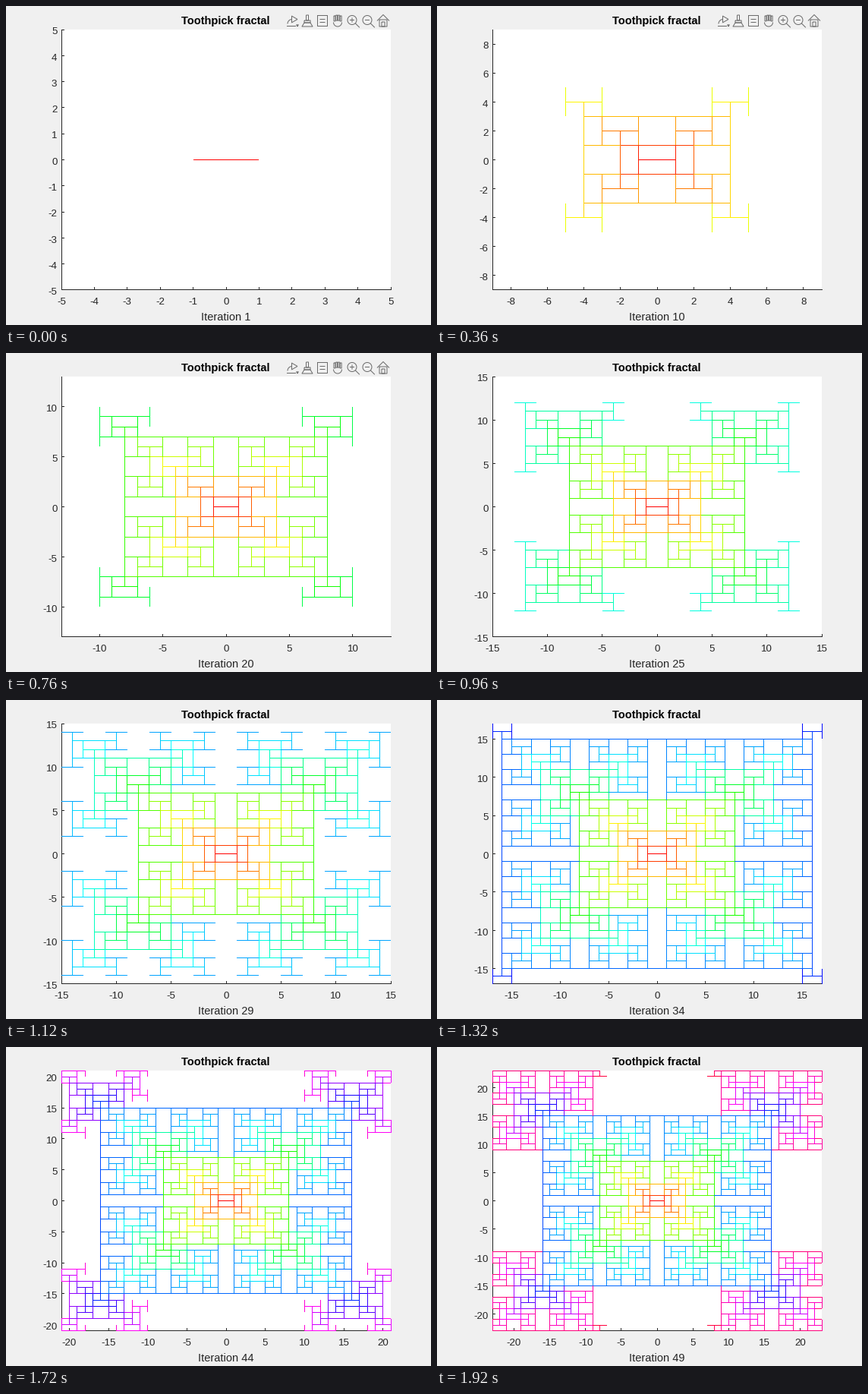
A matplotlib script that plays this animation: 560x420 px, repeating every 1960 ms.

```python
import colorsys
from collections import Counter

import matplotlib.pyplot as plt
import numpy as np
from matplotlib.animation import FuncAnimation
from matplotlib.collections import LineCollection
from matplotlib.patches import Rectangle

W, H, DPI = 560, 420, 70
PX = 72 / DPI                      # points per pixel
LEFT, RIGHT, TOP, BOTTOM = 73, 507, 31.1, 373.9
STEPS, TOOLBAR_STEPS = 49, 24
DARK, GREY = "#262626", "#6b6b6b"

plt.rcParams["font.family"] = "Liberation Sans"


def grow(steps):
    """Centre, half-length vector and step of every toothpick."""
    touched = Counter()
    front, sticks = [(0, 0)], []
    for n in range(steps):
        dx, dy = (1, 0) if n % 2 == 0 else (0, 1)
        sticks += [(x, y, dx, dy, n) for x, y in front]
        ends = [(x + s * dx, y + s * dy) for x, y in front for s in (-1, 1)]
        touched.update(ends + front)
        front = [p for p in ends if touched[p] == 1]
    sticks = np.array(sticks)
    return sticks[:, :2], sticks[:, 2:4], sticks[:, 4]


mid, arm, born = grow(STEPS)
wheel = np.array([colorsys.hsv_to_rgb(n / 50, 1, 1) for n in range(STEPS)])

fig = plt.figure(figsize=(W / DPI, H / DPI), dpi=DPI, facecolor="#f0f0f0")
ax = fig.add_axes([0, 0, 1, 1])
ax.set(xlim=(0, W), ylim=(H, 0))
ax.axis("off")


def strokes(segs, color, z):
    lines = LineCollection(segs, colors=color, linewidths=PX, capstyle="butt",
                           zorder=z, snap=False)
    return ax.add_collection(lines, autolim=False)


def label(x, y, text="", size=10, color=DARK, ha="center", **kw):
    return ax.text(x, y, text, fontsize=size * 4 / 3 * PX, color=color,
                   ha=ha, va="baseline", zorder=5, **kw)


def to_px(p, lim):
    """Data points to pixels."""
    f = (np.asarray(p) + lim) / (2 * lim)
    return np.array([LEFT, BOTTOM]) + f * np.array([RIGHT - LEFT, TOP - BOTTOM])


def crisp(a, b):
    """Fit upright and level segments to whole pixels."""
    a, b = np.asarray(a, float), np.asarray(b, float)
    across = np.isclose(a, b)
    return np.stack([np.where(across, np.floor(v) + 0.5, np.floor(v + 0.5))
                     for v in (a, b)], axis=1)


# Toolbar icons, each drawn around its own centre.
def ring(r, cx=0, cy=0, a=0, b=360, n=30):
    t = np.radians(np.linspace(a, b, n))
    return np.column_stack([cx + r * np.cos(t), cy + r * np.sin(t)])


def box(w, h, cx=0, cy=0, flare=0):
    x, y, f = w / 2, h / 2, w / 2 + flare
    return np.array([(-x, -y), (x, -y), (f, y), (-f, y), (-x, -y)]) + (cx, cy)


def dash(w, y, x=0):
    return np.array([(x - w / 2, y), (x + w / 2, y)])


def share():
    return [ring(6, 0, 4, 180, 270), ring(5, 2, -2, 0, 360, 4),
            dash(12, 7, -1), ring(1.5, 7, 6, 90, 450, 4)]


def brush():
    return [box(3, 7, 0, -4), box(8, 3, 0, 1), box(8, 5, 0, 5, flare=3)]


def note():
    return [box(13, 14), dash(7, -2), dash(7, 2)]


def hand():
    fingers = [box(2, 7, x, -2 - 2 * np.cos(x / 4)) for x in np.arange(-4, 5, 2.7)]
    return fingers + [ring(5.5, 0, 2, 0, 180)]


def lens(plus):
    parts = [ring(6, -1, -1), ring(4, 6, 6, 45, 225, 2), dash(6, -1, -1)]
    return parts + [dash(6, 1, 1)[:, ::-1] - 2] * plus


def home():
    return [ring(8, 0, 0, 180, 360, 3), box(10, 9, 0, 3), box(4, 6, 0, 4.5)]


icon_paths = [part + (377 + 20 * k, 19.5)
              for k, icon in enumerate([share(), brush(), note(), hand(),
                                        lens(True), lens(False), home()])
              for part in icon]

ax.add_patch(Rectangle((LEFT, 31), RIGHT - LEFT, 374 - 31, facecolor="white",
                       edgecolor="none", zorder=1))
strokes(crisp([(LEFT, TOP), (LEFT, BOTTOM)], [(LEFT, BOTTOM), (RIGHT + 1, BOTTOM)]),
        DARK, 2)
label(289.5, 24, "Toothpick fractal", 11, "black", weight="bold")

caption = label(289.5, 414, size=11)
x_labels = [label(0, 393) for _ in range(11)]
y_labels = [label(67.5, 0, ha="right") for _ in range(11)]
ticks = strokes([], DARK, 2)
pattern = strokes([], "red", 3)
icons = strokes(icon_paths, GREY, 4)


def update(i):
    n = i + 1
    lim = 5 + 2 * (n // 5)

    seen = (born <= i) & (np.abs(mid) <= lim).all(axis=1)
    a, b = (to_px(np.clip(mid + s * arm, -lim, lim)[seen], lim) for s in (-1, 1))
    pattern.set_segments(crisp(a, b))
    pattern.set_color(wheel[born[seen]])

    step = 1 if lim <= 5 else 2 if lim <= 11 else 5
    values = np.arange(-(lim // step) * step, lim + 1, step)
    x, y = to_px(np.column_stack([values, values]), lim).T
    left, low = np.full_like(x, LEFT), np.full_like(y, BOTTOM)
    ticks.set_segments(np.concatenate([
        crisp(np.column_stack([x, low]), np.column_stack([x, low - 4])),
        crisp(np.column_stack([left, y]), np.column_stack([left + 4, y]))]))

    for text in x_labels + y_labels:
        text.set_text("")
    for v, px, py, tx, ty in zip(values, x, y, x_labels, y_labels):
        tx.set(text=str(v), x=px)
        ty.set(text=str(v), y=py + 6.2)

    caption.set_text(f"Iteration {n}")
    icons.set_visible(n <= TOOLBAR_STEPS)
    return [pattern, ticks, caption, icons, *x_labels, *y_labels]


anim = FuncAnimation(fig, update, frames=STEPS, interval=40,
                     repeat=True, repeat_delay=0, blit=False)
plt.show()
```
